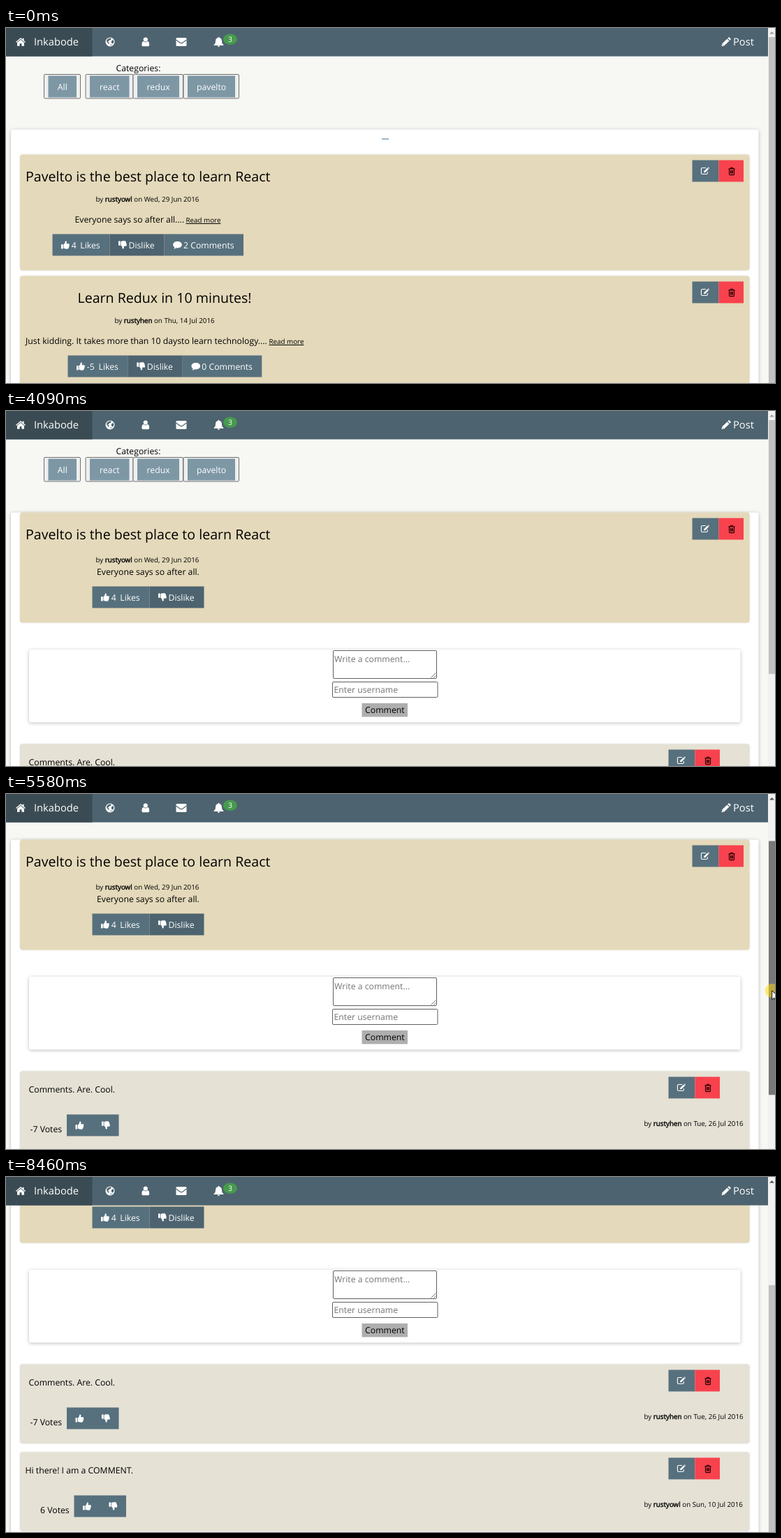
These frames come from a looping animation (1101x509 px, 9320 ms). An HTML page:

```html
<!DOCTYPE html>
<html lang="en">
<head>
<meta charset="utf-8">
<title>Post list</title>
<style>
  html, body { margin: 0; width: 100%; height: 100%; overflow: hidden; background: #f7f8f4; }
  svg { display: block; width: 1101px; height: 509px; }
  text { font-family: 'Open Sans', sans-serif; text-rendering: geometricPrecision; }
  .name { stroke: #000; stroke-width: .4px; }
  .raised { filter: drop-shadow(0 1.5px 2.5px rgba(0, 0, 0, .26)); }
  .flat { filter: drop-shadow(0 .6px .8px rgba(0, 0, 0, .14)); }
</style>
</head>
<body>
<svg id="stage" viewBox="0 0 1101 509"></svg>
<script>
const LOOP = 9320;
const BAR = '#4d636f', BUTTON = '#57707d', HOME = '#3a4b53', RED = '#f8424e';
const BIG = 19.6, NAV = 14.7, BODY = 12.25, SMALL = 9.8;

const rect = (x, y, w, h, fill, more = '') =>
  `<rect x="${x}" y="${y}" width="${w}" height="${h}" fill="${fill}" ${more}/>`;
const label = (x, y, words, size = BODY, fill = '#000', more = '') =>
  `<text x="${x}" y="${y}" font-size="${size}" fill="${fill}" ${more}>${words}</text>`;
const group = (x, y, body, more = '') =>
  `<g transform="translate(${x} ${y})" ${more}>${body}</g>`;
const path = (d, more = '') => `<path d="${d}" ${more}/>`;

// Icons sit in a box of about 14 by 14.
const thumb = path('M0 6h2.8v6.6H0zM3.6 6C5.6 4.9 5.7 3 6.2 1c1.900-.5 2.700 1.400 1.600 4H11c1.600 0 1.700 1.800.8 2.300.7.9.3 1.700-.3 2 .3.900 0 1.500-.6 1.700.2 1.200-.5 1.700-1.500 1.700H7.200c-1.500 0-2.300-.4-3.600-.9z');
const icons = {
  home: path('M0 7.400 7 1.400l2.600 2.200V2h2v3.300L14 7.400l-.8.9L7 3 .8 8.300zM2 8.300 7 4.100l5 4.200V13H8.400V9.500H5.600V13H2z'),
  globe: `<circle cx="7" cy="7" r="6.500"/>` +
    path('M5 2l2.500-.8L9 2.500 7.500 4 6 4.300 5 6 3.500 6.300 5.500 8l-.3 2.500L4 9 2 6l.5-2zM9 5.500l2.500-1.500 1 2.500-1 2.500-1.500.5-1.300-2zM7 11l2.500-.5-1 1.800z', `fill="${BAR}"`),
  user: '<circle cx="7" cy="3.700" r="3.100"/>' +
    path('M4.200 6.300C2 6.600 1.600 9 1.600 11.200c0 1.400.8 2.300 2 2.300h6.800c1.200 0 2-.9 2-2.300 0-2.200-.4-4.600-2.600-4.900C8.200 8 5.800 8 4.200 6.300z'),
  mail: path('M0 2.500Q0 1 1.300 1h12.400Q15 1 15 2.500v9Q15 13 13.700 13H1.300Q0 13 0 11.500z') +
    path('M0 4l5.800 4.200q1.700 1.200 3.400 0L15 4', `fill="none" stroke="${BAR}" stroke-width="1.100"`),
  bell: path('M7 0q.9 0 .9 1.200C10.500 1.700 11.500 3.500 11.500 6c0 3 1 4.200 2.500 5.500v.7H0v-.7C1.500 10.200 2.500 9 2.500 6c0-2.500 1-4.300 3.600-4.800Q6.100 0 7 0zM5.200 12.700h3.600Q8.500 14.300 7 14.300t-1.800-1.600z'),
  pen: path('M0 13.300l.8-3.700L8 2.400l3 3-7.200 7.200zM8.800 1.600 9.900.5q.7-.6 1.400 0l1.700 1.700q.6.700 0 1.400l-1.200 1.100z') +
    path('M1.200 10.600l1.700 1.700', `stroke="${BAR}" stroke-width=".8"`),
  up: thumb,
  down: `<g transform="matrix(1 0 0 -1 0 13.600)">${thumb}</g>`,
  talk: path('M6.500 1.600c3.600 0 6.300 2 6.300 4.700S10.100 11 6.500 11c-.6 0-1.200 0-1.700-.2-1 .9-2.200 1.400-3.600 1.600.7-.7 1.100-1.400 1.200-2.300C1 9.200.2 7.800.2 6.300.2 3.600 2.900 1.600 6.500 1.600z'),
  edit: path('M8 2.200H2.700Q1 2.200 1 3.900v6.200q0 1.700 1.700 1.700h6.200q1.700 0 1.700-1.700V8.200', 'fill="none" stroke="#fff" stroke-width="1.200"') +
    path('M5 7.400l5.300-5.300 2 2L7 9.400H5zM10.900 1.500l.7-.7 2 2-.7.700z'),
  bin: path('M2 3.400h9M4.700 3.200l.5-1.500h2.600l.5 1.500M3 3.700v7.200q0 1.200 1 1.200h5q1 0 1-1.200V3.700M5 5.400v4.800M6.500 5.400v4.800M8 5.400v4.800', 'fill="none" stroke="#200" stroke-width="1.100"'),
};
const icon = (kind, x, y, fill = '#fff', scale = 1) =>
  `<g transform="translate(${x} ${y}) scale(${scale})" fill="${fill}">${icons[kind]}</g>`;

const byline = (x, y, who, date) =>
  label(x, y, `by <tspan class="name">${who}</tspan> on ${date}`, SMALL);
const tools = (x, y) => rect(x, y, 38, 31, BUTTON) + rect(x + 38, y, 35.5, 31, RED) +
  icon('edit', x + 12, y + 9, '#fff', .93) + icon('bin', x + 50, y + 9, '#200');

const likeBar = (x, y, count, shift = 0) =>
  rect(x, y, 82 + shift, 31, BUTTON) + rect(x + 82 + shift, y, 78, 31, BAR) +
  icon('up', x + 12.5, y + 9, '#fff', .96) + icon('down', x + 94.5 + shift, y + 9, '#fff', .96) +
  label(x + 27.300, y + 20.300, count, BODY, '#fff') +
  label(x + 39.800 + shift, y + 20.300, 'Likes', BODY, '#fff') +
  label(x + 109 + shift, y + 20.300, 'Dislike', BODY, '#fff');

function listCard(y, p) {
  const end = p.bar + 160 + p.shift;
  return group(0, y,
    rect(20, 0, 1044.5, 166, '#e4d9ba', 'rx="4" class="flat"') + tools(982.5, 8) +
    label(p.titleX, 38, p.title, BIG) + byline(p.byX, 67.5, p.who, p.date) +
    label(p.textX, 97.5, p.text) +
    label(p.moreX, 97.5, 'Read more', SMALL, '#000', 'text-decoration="underline"') +
    likeBar(p.bar, 114, p.likes, p.shift) + rect(end, 114, 113.5, 31, BUTTON) +
    icon('talk', end + 12.5, 123) + label(end + 27.500, 134.300, p.talk, BODY, '#fff'));
}

function comment(y, c) {
  return group(0, y,
    rect(20, 0, 1044.5, 113.5, '#e5e1d5', 'rx="4" class="flat"') + tools(948.5, 8) +
    label(c.textX, 30.5, c.text) + label(c.voteX, 87, c.votes) +
    rect(c.bar, 62, 74.5, 31, BUTTON) +
    icon('up', c.bar + 12.5, 71, '#fff', .96) + icon('down', c.bar + 50, 71, '#fff', .96) +
    byline(913.5, 78, c.who, c.date));
}

const title = 'Pavelto is the best place to learn React';
const panel = rect(7, 145.5, 1070.5, 900, '#fff', 'rx="3" class="raised"');

const category = (x, w, words) =>
  rect(x + .5, 66.5, w - 1, 34.5, '#efefef', 'rx="1.500" stroke="#707070"') +
  rect(x + 6.5, 68.5, w - 12.5, 31, '#7d97a5') +
  label(x + w / 2 + .3, 88.5, words, BODY, '#fff', 'text-anchor="middle"');

const header = label(157.5, 62, 'Categories:') + category(54, 53, 'All') +
  category(113.5, 69, 'react') + category(181.5, 72.5, 'redux') + category(253.500, 80.5, 'pavelto');

const listPage = panel + rect(538, 158.5, 10, 1.400, '#6f9db8') +
  listCard(181.5, {
    titleX: 28, title, byX: 128.5, who: 'rustyowl', date: 'Wed, 29 Jun 2016',
    textX: 98.5, text: 'Everyone says so after all....', moreX: 257.5,
    bar: 66.5, likes: '4', shift: 0, talk: '2 Comments' }) +
  listCard(355.5, {
    titleX: 102.500, title: 'Learn Redux in 10 minutes!', byX: 155.5, who: 'rustyhen', date: 'Thu, 14 Jul 2016',
    textX: 28, text: 'Just kidding. It takes more than 10 daysto learn technology....', moreX: 376.5,
    bar: 88.5, likes: '-5', shift: 4.300, talk: '0 Comments' });

const field = (x, y, w, h) => rect(x, y, w, h, '#fff', 'rx="1.500" stroke="#5f5f5f"');
const form = rect(33, 342, 1018.5, 104.5, '#fff', 'rx="3" class="raised"') +
  field(468.5, 343.5, 148, 40) + label(470, 359.5, 'Write a comment...', BODY, '#757575') +
  path('M608.500 382.500l7-7M612.500 382.500l3-3', 'stroke="#777"') +
  field(467.5, 388.5, 150.5, 22) + label(469.5, 404, 'Enter username', BODY, '#757575') +
  rect(509.5, 419, 65.5, 19.5, '#aeaeae') + label(514, 433.300, 'Comment');

const postPage = panel +
  rect(20, 145.5, 1044.5, 158, '#e4d9ba', 'rx="4" class="flat"') + tools(982.5, 153.5) +
  label(28, 183.5, title, BIG) + byline(128.5, 217, 'rustyowl', 'Wed, 29 Jun 2016') +
  label(130, 235, 'Everyone says so after all.') + likeBar(123.5, 251.5, '4') + form +
  comment(477.5, { textX: 32.500, text: 'Comments. Are. Cool.', voteX: 34.5, votes: '-7 Votes',
    bar: 87, who: 'rustyhen', date: 'Tue, 26 Jul 2016' }) +
  comment(603.5, { textX: 27.500, text: 'Hi there! I am a COMMENT.', voteX: 49, votes: '6 Votes',
    bar: 97.5, who: 'rustyowl', date: 'Sun, 10 Jul 2016' });

const nav = rect(0, 0, 1091, 40.6, BAR) + rect(0, 0, 123.5, 40.6, HOME) +
  icon('home', 14, 12.700) + label(40, 25.300, 'Inkabode', NAV, '#fff') +
  icon('globe', 142, 13) + icon('user', 192.800, 12.800) + icon('mail', 243.5, 13) + icon('bell', 297.5, 12.700) +
  '<ellipse cx="321" cy="16.200" rx="10" ry="7.800" fill="#479a4e"/>' +
  label(321, 20, '3', 10.5, '#fff', 'text-anchor="middle"') +
  icon('pen', 1024.5, 13) + label(1041, 25.300, 'Post', NAV, '#fff');

const arrow = path('M0 0v13l3-2.800 2 4.700 2.200-.9-2-4.600h4.300z', 'fill="#fff" stroke="#000" stroke-width=".9"');
const hand = path('M-1.200 11V1.200Q-1.200 0 0 0t1.200 1.200V6l.3-.5Q3.700 5 4 6.500q2-.5 2.300.9 2-.3 2.200 1.300v4.300q0 2-1 3.500v1.900H-.8v-1.500L-4.300 11.500q-.8-1.600.5-2 1.200-.2 2.600 1.500zM1.400 6v4M4 6.700V10M6.300 7.500V10', 'fill="#fff" stroke="#000" stroke-width=".9"');

document.getElementById('stage').innerHTML =
  rect(0, 0, 1101, 509, '#f7f8f4') +
  `<g id="page">${header}<g id="list">${listPage}</g><g id="post">${postPage}</g></g>` + nav +
  rect(1091, 0, 10, 509, '#f1f1f1') + rect(1092, 13, 9, 364, '#c1c1c1', 'id="thumb"') +
  path('M1093 8.500l3.500-3.500 3.500 3.500z', 'id="tick"') +
  `<g id="pointer"><circle id="press" r="10" fill="#ffd800" opacity=".5"/>
   <g id="arrow">${arrow}</g><g id="hand">${hand}</g></g>`;

// Each row holds until the next: time, x, y, shape ("p" marks a pressed button).
const moves = [
  [0, 0, 0, ''], [420, 1090, 502, 'a'], [500, 1073, 499, 'a'],
  [820, 960, 440, 'a'], [900, 720, 350, 'a'], [970, 520, 300, 'a'], [1050, 440, 284, 'a'],
  [1370, 425, 282, 'a'], [1450, 405, 280, 'a'], [1530, 385, 278, 'a'], [1600, 368, 277, 'a'], [1680, 358, 276, 'a'],
  [1990, 352, 276, 'a'], [2070, 344, 276, 'a'], [2150, 335, 276, 'a'], [2230, 326, 276, 'a'], [2310, 318, 276, 'a'],
  [2390, 311, 276, 'a'], [2470, 304, 276, 'h'], [2550, 299, 276, 'h'], [2630, 297, 276.5, 'h'],
  [2860, 297, 276.5, 'hp'], [3010, 297, 276.5, 'h'], [3090, 296, 276, 'a'],
  [3620, 480, 262, 'a'], [3700, 820, 211, 'a'], [3790, 1025, 215, 'a'], [4010, 1036, 215.5, 'a'], [4090, 0, 0, ''],
  [4560, 1070, 220, 'a'], [4640, 1092, 226, 'a'], [4720, 1095.5, 227, 'ap'], [6110, 1099, 360, 'p'], [6900, 0, 0, ''],
];
const scrolls = [[0, 0], [4800, 10], [5100, 34], [5190, 51], [5270, 64], [5350, 72], [5580, 80],
  [5650, 112], [5730, 142], [5810, 165], [6110, 196], [6200, 209]];
const shades = [[0, '#c1c1c1'], [4640, '#a8a8a8'], [4720, '#787878'], [6900, '#a8a8a8'], [8370, '#b5b5b5'], [8460, '#c1c1c1']];

const rowAt = (rows, t) => rows.findLast(row => row[0] <= t);
const el = id => document.getElementById(id);
const show = (id, on) => el(id).setAttribute('visibility', on ? 'visible' : 'hidden');
const move = (id, x, y) => el(id).setAttribute('transform', `translate(${x} ${y})`);

function draw(t) {
  const [, scroll] = rowAt(scrolls, t);
  const [, shade] = rowAt(shades, t);
  let [, x, y, shape] = rowAt(moves, t);
  const opened = t >= 3090, travel = scroll * .68;
  if (scroll && shape) {
    x = 1095.3 + scroll * .018;
    y = 227.5 + travel;
  }
  show('list', !opened);
  show('post', opened);
  move('page', 0, -scroll);
  el('thumb').setAttribute('y', 13 + travel);
  el('thumb').setAttribute('height', opened ? 364 : 520);
  el('thumb').setAttribute('fill', shade);
  el('tick').setAttribute('fill', scroll ? '#505050' : '#a3a3a3');
  move('pointer', x, y);
  show('arrow', shape.includes('a'));
  show('hand', shape.includes('h'));
  show('press', shape.includes('p'));
}

const start = performance.now();
function tick() {
  draw((performance.now() - start) % LOOP);
  requestAnimationFrame(tick);
}
tick();
</script>
</body>
</html>
```
